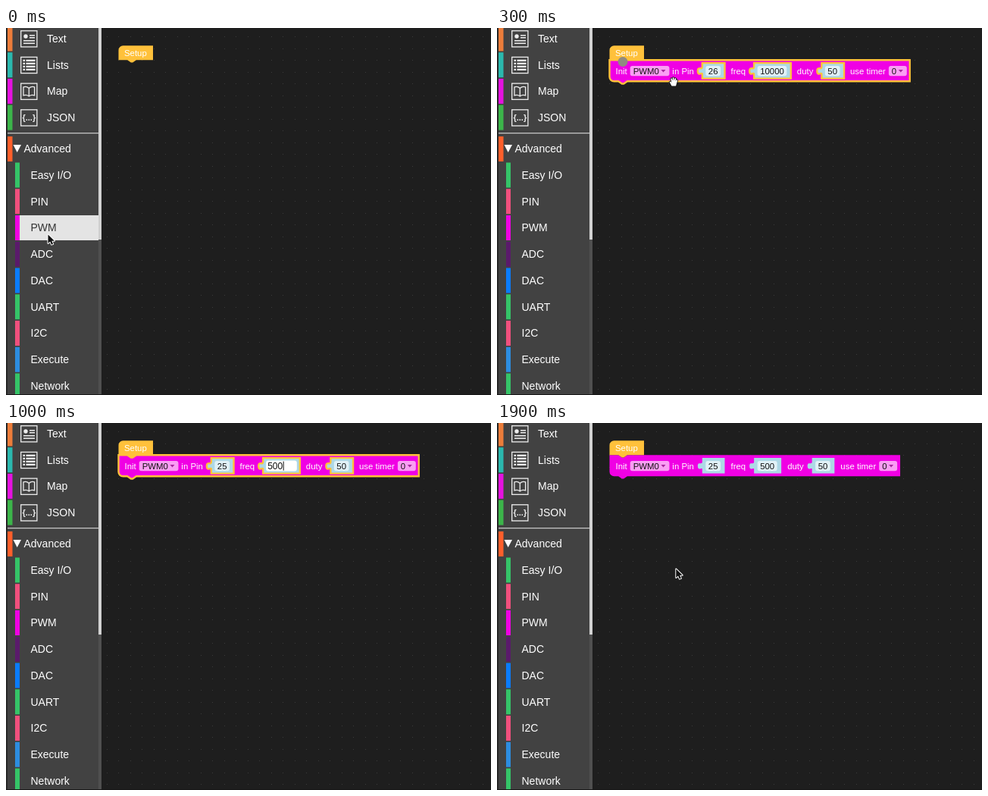
Write an HTML page with a canvas that moves like this. It is 640 px wide and 484 px high and loops after 2000 ms.

```html
<!DOCTYPE html>
<html lang="en">
<head>
<meta charset="utf-8">
<title>PWM block setup</title>
<style>
html, body { margin: 0; width: 100%; height: 100%; overflow: hidden; background: #1e1e1e; }
canvas { display: block; width: 640px; height: 484px; }
</style>
</head>
<body>
<canvas id="stage" width="640" height="484"></canvas>
<script>
const ctx = document.getElementById('stage').getContext('2d');
const STEP = 100, STEPS = 20;
const FONT = '"Liberation Sans", Arial, sans-serif';
const MAGENTA = '#f000e4', YELLOW = '#ffc13b', SOCKET = '#add8e6', FIELD = '#e1f1f7';

const rect = (x, y, w, h, color) => { ctx.fillStyle = color; ctx.fillRect(x, y, w, h); };

function pill(x, y, w, h, r, color) {
  ctx.beginPath();
  ctx.roundRect(x, y, w, h, r);
  ctx.fillStyle = color;
  ctx.fill();
}

function label(str, x, middle, color = '#fff', size = 11.4) {
  ctx.font = `${size}px ${FONT}`;
  ctx.fillStyle = color;
  ctx.fillText(str, x, middle + size * 0.35);
  return ctx.measureText(str).width;
}

function textWidth(str) {
  ctx.font = `11.4px ${FONT}`;
  return ctx.measureText(str).width;
}

function polygon(points, color) {
  ctx.beginPath();
  points.forEach(([x, y]) => ctx.lineTo(x, y));
  ctx.closePath();
  ctx.fillStyle = color;
  ctx.fill();
}

// ---------- Sidebar ----------

const categories = [
  ['Text', '#ed7d3a', 14], ['Lists', '#2bb8ae', 48.7],
  ['Map', '#e612e0', 83.4], ['JSON', '#3cb54a', 118.1]
];
const advanced = [
  ['Easy I/O', '#35c468'], ['PIN', '#f0507d'], ['PWM', MAGENTA],
  ['ADC', '#5a1a6b'], ['DAC', '#0a7cff'], ['UART', '#35c468'],
  ['I2C', '#f0507d'], ['Execute', '#2d8de0'], ['Network', '#35c468']
];

function icon(name, y) {
  ctx.save();
  ctx.translate(19, y - 11);
  ctx.strokeStyle = '#eee';
  ctx.lineWidth = 1.3;
  ctx.strokeRect(0.7, 0.7, 21.2, 21.2);
  if (name === 'Text') {
    ctx.beginPath();
    ctx.arc(7, 8, 2.7, 0, 7);
    ctx.fillStyle = '#eee';
    ctx.fill();
    rect(12, 6, 7, 1.5, '#eee');
    rect(12, 9, 7, 1.5, '#eee');
    rect(4, 13, 15, 1.5, '#eee');
    rect(4, 16.5, 15, 1.5, '#eee');
  } else if (name === 'Lists') {
    for (let i = 0; i < 4; i++) {
      rect(3.5, 4 + i * 4, 2.5, 2.3, '#eee');
      rect(7.5, 4 + i * 4, 12, 2.3, '#eee');
    }
  } else if (name === 'Map') {
    ctx.stroke(new Path2D('M11.3 7 Q8 4 4 5.5 V16.5 Q8 15 11.3 17.5 Q14.6 15 18.6 16.5 V5.5 Q14.6 4 11.3 7 V17.5'));
  } else {
    ctx.font = `bold 11px ${FONT}`;
    ctx.fillStyle = '#eee';
    ctx.textAlign = 'center';
    ctx.fillText('{...}', 11.3, 14.6);
  }
  ctx.restore();
}

function sidebar(pwmState) {
  rect(0, 0, 2, 484, '#282828');
  rect(2, 0, 120, 484, '#424242');
  rect(122, 0, 4, 484, '#505050');
  rect(122, 0, 4, 279, '#d2d2d2');
  for (const [name, color, y] of categories) {
    rect(2, y - 16.5, 6.5, 33, color);
    icon(name, y);
    label(name, 54, y, '#fff', 14);
  }
  rect(2, 138, 120, 1.3, '#c4c4c4');
  rect(2, 143, 6.5, 33, '#ff5f2b');
  polygon([[9.5, 154], [20, 154], [14.7, 164]], '#fff');
  label('Advanced', 23.5, 159, '#fff', 14);
  advanced.forEach(([name, color], i) => {
    const y = 194 + i * 34.75;
    const state = name === 'PWM' ? pwmState : '';
    if (state === 'hover') rect(18, y - 16.5, 104, 33, '#e4e4e4');
    rect(12, y - 16.5, state === 'open' ? 110 : 6, 33, color);
    label(name, 32.5, y, state === 'hover' ? '#333' : '#fff', 14);
  });
}

// ---------- Workspace and blocks ----------

function grid() {
  rect(0, 0, 640, 484, '#1e1e1e');
  for (let x = 132.5; x < 640; x += 15.5)
    for (let y = 11; y < 484; y += 15.5) rect(Math.round(x), Math.round(y), 1, 1, '#3b3b3b');
}

function blockPath(x, y, w, h, attached, topNotch) {
  ctx.beginPath();
  ctx.moveTo(x, y + 6);
  if (attached) ctx.lineTo(x, y);
  else ctx.arcTo(x, y, x + 6, y, 6);
  if (topNotch) {
    ctx.lineTo(x + 11.7, y);
    ctx.lineTo(x + 16.4, y + 3.2);
    ctx.lineTo(x + 18.7, y + 3.2);
    ctx.lineTo(x + 23.4, y);
  }
  ctx.lineTo(x + w, y);
  ctx.lineTo(x + w, y + h);
  ctx.lineTo(x + 23.4, y + h);
  ctx.lineTo(x + 18.7, y + h + 3.2);
  ctx.lineTo(x + 16.4, y + h + 3.2);
  ctx.lineTo(x + 11.7, y + h);
  ctx.arcTo(x, y + h, x, y + h - 6, topNotch ? 6 : 0.1);
  ctx.closePath();
}

function fillBlock(color, selected) {
  ctx.fillStyle = color;
  ctx.fill();
  if (selected) outline();
}

function outline() {
  ctx.strokeStyle = YELLOW;
  ctx.lineWidth = 2.4;
  ctx.stroke();
}

function setupBlock() {
  blockPath(148.5, 23.3, 45.5, 19, false, false);
  fillBlock(YELLOW);
  label('Setup', 156, 33);
}

function dropdown(str, x, mid) {
  const w = textWidth(str) + 17.6;
  pill(x, mid - 6.7, w, 13.4, 3, '#fa9ef4');
  label(str, x + 4, mid, '#111');
  polygon([[x + w - 11, mid - 1.5], [x + w - 5, mid - 1.5], [x + w - 8, mid + 2]], '#a8289f');
  return w;
}

function socket(value, x, mid, selected, edit) {
  const fieldW = textWidth(value) + 7, w = fieldW + 10;
  ctx.beginPath();
  ctx.moveTo(x, mid - 10.5);
  ctx.lineTo(x + w, mid - 10.5);
  ctx.lineTo(x + w, mid + 10);
  ctx.lineTo(x, mid + 10);
  ctx.lineTo(x, mid + 4);
  ctx.bezierCurveTo(x, mid + 1.5, x - 6, mid + 7.5, x - 6, mid);
  ctx.bezierCurveTo(x - 6, mid - 6.5, x, mid - 1, x, mid - 5);
  ctx.closePath();
  fillBlock(SOCKET, selected);
  if (edit) {
    pill(x + 4, mid - 7, fieldW + 2, 14, 3, '#fff');
    if (edit.marked) rect(x + 6, mid - 6, textWidth(edit.text) + 1, 12, '#b3d7ff');
    const typed = label(edit.text, x + 6, mid, '#111', 12);
    if (edit.caret) rect(x + 6.5 + typed, mid - 6, 1, 12, '#111');
  } else {
    pill(x + 4.5, mid - 6.7, fieldW, 13.4, 3, FIELD);
    label(value, x + 8, mid, '#111');
  }
  return w;
}

// Parts are laid out left to right: plain text, {menu} or {value}.
function row(x, y, parts, { selected = false, attached = false } = {}) {
  const tall = parts.some(p => p.value);
  const h = tall ? 28 : 20, mid = y + (tall ? 14.3 : 10);
  const place = draw => {
    let cx = x + 8;
    parts.forEach((p, i) => {
      if (p.menu) {
        if (draw) dropdown(p.menu, cx, mid);
        cx += textWidth(p.menu) + 21.5;
      } else if (p.value) {
        if (draw) socket(p.value, cx, mid, selected, p.edit);
        cx += textWidth(p.value) + 25;
      } else {
        if (draw) label(p, cx, mid);
        cx += textWidth(p) + (parts[i + 1].value ? 11 : 4);
      }
    });
    return cx - x;
  };
  blockPath(x, y, place(false), h, attached, true);
  fillBlock(MAGENTA, selected);
  place(true);
}

const pwm = { menu: 'PWM0' };

function initBlock(x, y, { pin = '26', freq = '10000', pinEdit, freqEdit, ...look } = {}) {
  row(x, y, ['Init', pwm, 'in Pin', { value: pin, edit: pinEdit },
    'freq', { value: freq, edit: freqEdit }, 'duty', { value: '50' },
    'use timer', { menu: '0' }], look);
}

function flyout(selected) {
  ctx.globalAlpha = 0.88;
  rect(126, 0, 423, 484, '#303030');
  ctx.globalAlpha = 1;
  initBlock(138.5, 7.7, { selected });
  row(138.5, 58, ['set', pwm, 'freq to', { value: '1' }]);
  row(138.5, 108, ['set', pwm, 'duty to', { value: '0' }]);
  row(138.5, 158.5, ['Pause', pwm]);
  row(138.5, 200.3, ['Resume', pwm]);
}

// ---------- Pointer ----------

const ARROW = new Path2D('M0 0V11.6L2.7 9.1L4.6 13.2L6.6 12.3L4.8 8.3H8.4Z');
const HAND = new Path2D('M3 12L0.4 7.2Q0 5.6 1.6 6.2L2.8 7.4L1.8 2.6Q2 1.2 3.2 2L4.2 5L4.3 1.2Q5 0 5.9 1.2L6.2 5L7.2 1.7Q8.2 1 8.7 2.2L8.2 5.6L9.5 3.7Q10.7 3.4 10.7 4.8L9.3 9.2L8.6 12Z');

function pointer([x, y, shape]) {
  const hand = shape === 'hand';
  ctx.save();
  ctx.translate(x, y);
  ctx.lineJoin = 'round';
  ctx.strokeStyle = hand ? '#111' : '#fff';
  ctx.lineWidth = hand ? 1.6 : 2;
  ctx.stroke(hand ? HAND : ARROW);
  ctx.fillStyle = hand ? '#fff' : '#111';
  ctx.fill(hand ? HAND : ARROW);
  ctx.restore();
}

// ---------- Timeline ----------

const pinEdits = { 5: { text: '26', marked: true }, 6: { text: '25' } };
const freqEdits = {
  7: { text: '10000', marked: true }, 8: { text: '5', caret: true },
  9: { text: '50', caret: true }, 10: { text: '500', caret: true }
};
const pointers = {
  0: [55.5, 272.5], 1: [72, 262], 2: [224.5, 27],
  3: [227.5, 64.5, 'hand'], 4: [262, 58, 'hand'], 5: [288, 53, 'hand'],
  6: [292, 51.5, 'hand'], 11: [380, 94]
};

function pointerAt(step) {
  if (step < 12) return pointers[step];
  const k = (step - 12) / 7, ease = k * k * (3 - 2 * k);
  return [382.3 - 146 * ease, 106.5 + 86 * ease];
}

function draw(step) {
  const flyoutOpen = step === 1 || step === 2;
  grid();
  if (step > 2) {
    initBlock(148.5, 42.3, {
      attached: true,
      selected: step < 11,
      pin: step > 6 ? '25' : '26',
      freq: step > 10 ? '500' : '10000',
      pinEdit: pinEdits[step],
      freqEdit: freqEdits[step]
    });
  }
  setupBlock();
  if (step === 3) {
    ctx.beginPath();
    ctx.arc(166, 44.5, 6.5, 0, 7);
    ctx.fillStyle = '#918b80';
    ctx.fill();
  }
  if (flyoutOpen) flyout(step === 2);
  sidebar(step === 0 ? 'hover' : flyoutOpen ? 'open' : '');
  rect(0, 483, 640, 1, '#181818');
  const at = pointerAt(step);
  if (at) pointer(at);
}

const start = performance.now();
let shown = -1;

function tick() {
  const step = Math.floor((performance.now() - start) / STEP) % STEPS;
  if (step !== shown) draw(shown = step);
  requestAnimationFrame(tick);
}
tick();
</script>
</body>
</html>
```
